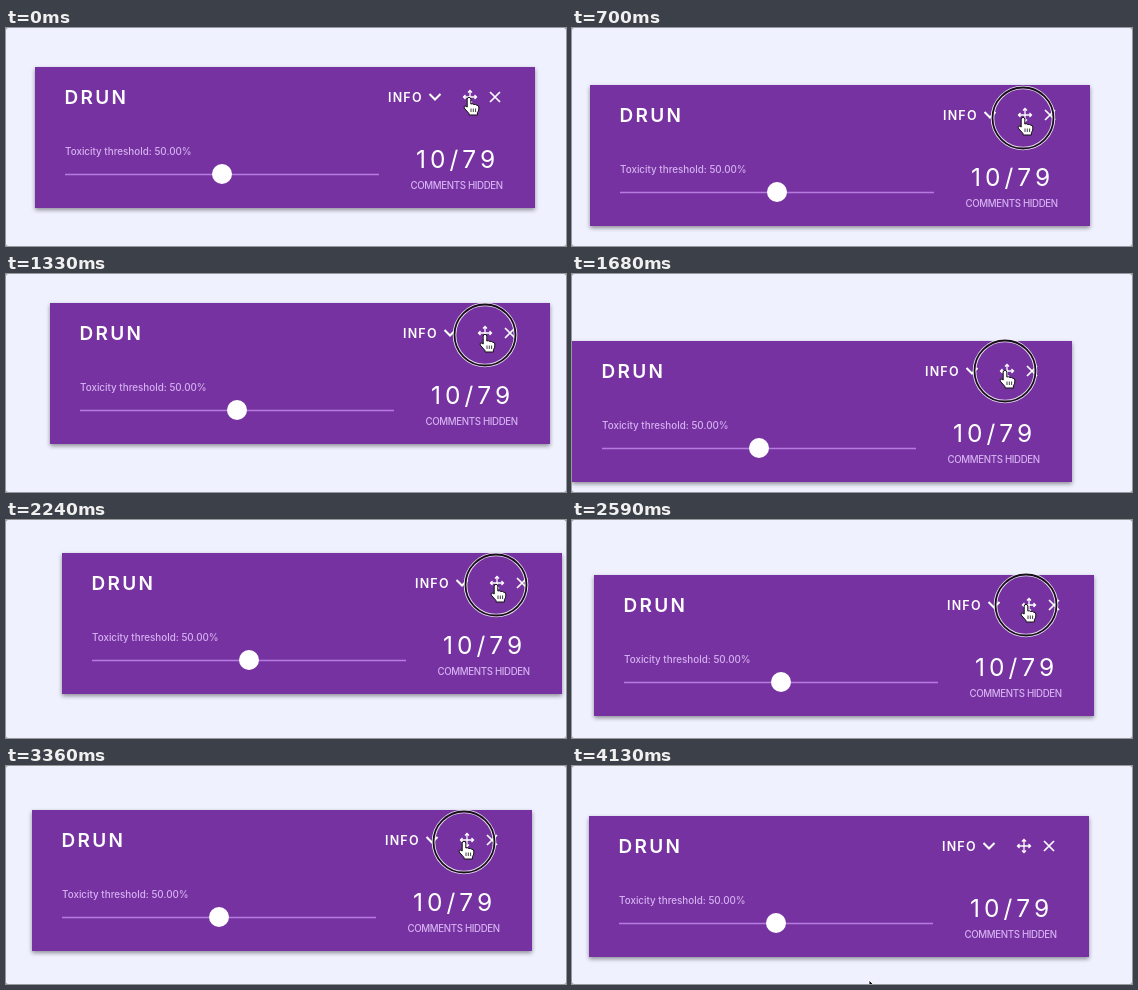
Write an HTML page that moves like this. It is 560 by 218 pixels and loops after 4.2 s.

```html
<!DOCTYPE html>
<html lang="en">
<head>
<meta charset="utf-8">
<title>Draggable panel</title>
<style>
  html, body { margin: 0; width: 100%; height: 100%; overflow: hidden; background: #9a9aa4; }
  svg { display: block; font-family: Inter, "Open Sans", sans-serif; }
  .panel { fill: #7632a0; filter: drop-shadow(0 2px 2.3px rgba(0, 0, 0, .42)); }
  .soft { fill: #d6b2f2; font-weight: 500; }
  .line { fill: none; stroke: #fff; }
</style>
</head>
<body>
<svg width="560" height="218" viewBox="0 0 560 218">
  <rect width="560" height="218" rx="2.5" fill="#f0f1ff"/>
  <g id="card" fill="#fff">
    <rect class="panel" width="500" height="141"/>
    <text x="29.5" y="37" font-size="19" font-weight="600" letter-spacing="2.3">DRUN</text>
    <text x="353" y="34.5" font-size="12.5" font-weight="600" letter-spacing="1.2">INFO</text>
    <path class="line" stroke-width="2" d="M394.5 27l5.5 5.5 5.5-5.5"/>
    <path class="line" stroke-width="1.3" d="M428.5 30h13M435 23.5v13M433 25.5l2-2 2 2M433 34.5l2 2 2-2M430.5 28l-2 2 2 2M439.5 28l2 2-2 2"/>
    <path class="line" stroke-width="1.7" d="M455 25l10 10M465 25l-10 10"/>
    <text class="soft" x="30" y="88" font-size="9.85">Toxicity threshold: 50.00%</text>
    <path d="M30 107.5h314" stroke="#b57be0" stroke-width="1.6"/>
    <circle cx="187" cy="107" r="10"/>
    <text x="381" y="101" font-size="24.5" letter-spacing="4">10/79</text>
    <text class="soft" x="375.5" y="122" font-size="9.7" letter-spacing="-.35">COMMENTS HIDDEN</text>
  </g>
  <g id="cursor">
    <g id="ring" fill="none">
      <circle r="30.5" stroke="#fff" stroke-opacity=".85" stroke-width="3.6"/>
      <circle r="30.5" stroke="#17101c" stroke-width="1.8"/>
    </g>
    <g id="hand" stroke="#111">
      <path fill="#fff" d="M-1.8 9V1.2a1.8 1.8 0 0 1 3.6 0V6q1.6-.8 3 .5 1.6-.6 2.8.7 2-.2 2.2 1.8v2q0 2-1.4 3.6V17H0v-1.5L-4.8 10q-.6-2 1-2z"/>
      <path stroke-width=".8" d="M2 10.5V14m2.3-3.5V14m2.3-3.5V14"/>
    </g>
    <path id="arrow" fill="#000" stroke="#fff" stroke-width=".9" d="M0 0v15l3.5-3.3 2.2 5.2 2.3-1-2.2-5h4.7z"/>
  </g>
</svg>
<script>
const LOOP = 4200, STEP = 70;
const LEAD = 12;                    // the panel trails the pointer slightly
const GRIP = [434, 31];             // pointer tip inside the panel
const RELEASE = 3570, LEAVE = 3600;
const DRIFT = [-.29, .25];          // px per ms after letting go

// Turning points of the shaking hand: time, position
const swingX = [[490, 29], [980, 1], [1400, 47], [1720, -2], [2240, 56], [2770, 10], [3050, 57], [3500, 17]];
const swingY = [[490, 39], [800, 63], [1240, 24], [1650, 68], [1960, 14], [2560, 56], [2870, 11], [3150, 72], [3340, 44], [3500, 50]];

const clamp = u => Math.max(0, Math.min(1, u));

// Each swing eases from one turning point to the next
function swing(turns, t) {
  let pos = turns[0][1];
  for (let i = 1; i < turns.length; i++) {
    const [t0, p0] = turns[i - 1], [t1, p1] = turns[i];
    pos += (p1 - p0) * (1 - Math.cos(Math.PI * clamp((t - t0) / (t1 - t0)))) / 2;
  }
  return pos;
}
const panelAt = t => [swing(swingX, t), swing(swingY, t)];
const pointerAt = t => panelAt(t + LEAD).map((p, i) => p + GRIP[i] + DRIFT[i] * Math.max(0, t - LEAVE));

const [card, cursor, ring, hand, arrow] =
  ["card", "cursor", "ring", "hand", "arrow"].map(id => document.getElementById(id));
const place = (node, p) => node.setAttribute("transform", `translate(${p.map(Math.round)})`);
const show = (node, alpha) => node.setAttribute("opacity", +alpha);

function draw(t) {
  const onIcon = t < LEAVE + 100;
  place(card, panelAt(t));
  place(cursor, pointerAt(t));
  show(ring, t < RELEASE ? clamp(t / 210) : 0);
  show(hand, onIcon);
  show(arrow, !onIcon);
}

const start = performance.now();
function tick() {
  const t = (performance.now() - start) % LOOP;
  draw(Math.floor(t / STEP) * STEP);
  requestAnimationFrame(tick);
}
tick();
</script>
</body>
</html>
```
